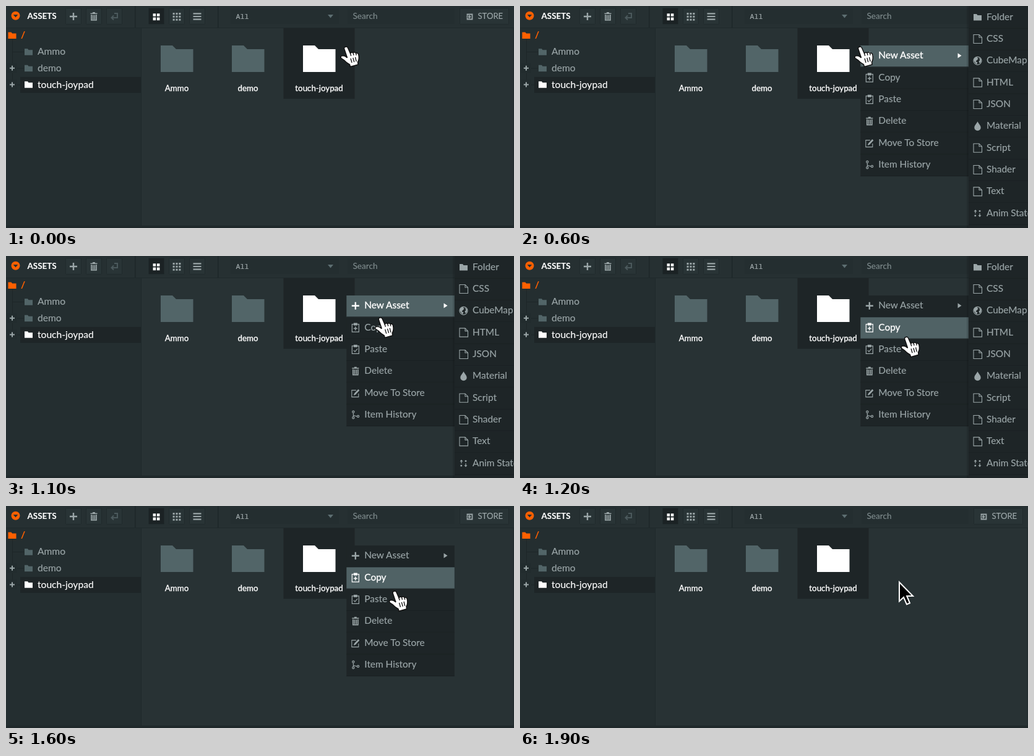
These frames come from a looping animation (821 by 360 pixels, 2.1 s). An HTML page:

```html
<!DOCTYPE html>
<html lang="en">
<head>
<meta charset="utf-8">
<title>Assets panel</title>
<style>
html, body { margin: 0; width: 100%; height: 100%; overflow: hidden; background: #283234; }
svg { display: block; width: 821px; height: 360px; font: 15.4px Lato, sans-serif; }
text { fill: currentColor; stroke: currentColor; stroke-width: .15; }
.line { fill: none; stroke: currentColor; stroke-width: 1.2; }
.solid { fill: currentColor; }
.row { color: #9ba6a8; }
.row .back { fill: #1e2527; }
.row.on { color: #fff; }
.row.on .back { fill: #506265; }
.row.on text, .strong { stroke-width: .35; }
</style>
</head>
<body>
<svg id="stage" viewBox="0 0 821 360"></svg>
<script>
const LOOP = 2100, STEP = 100, ROW = 35.35;
const BRIGHT = '#fff', SOFT = '#9ba6a8', DIM = '#526568', ORANGE = '#ff6000', DARK = '#1e2527';

const rect = (x, y, w, h, fill, extra = '') =>
  `<rect x="${x}" y="${y}" width="${w}" height="${h}" fill="${fill}" ${extra}/>`;
const text = (x, y, label, color, extra = '') =>
  `<text x="${x}" y="${y}" color="${color}" ${extra}>${label}</text>`;
const at = (x, y, content, color = 'inherit') =>
  `<g transform="translate(${x} ${y})" color="${color}">${content}</g>`;
const line = (d, width = 1.2) => `<path class="line" d="${d}" style="stroke-width:${width}"/>`;
const solid = d => `<path class="solid" d="${d}"/>`;
const square = (x, y, size) => `M${x} ${y}h${size}v${size}h${-size}z`;

const board = line('M-3-5.5H-5.5V7H5.5V-5.5H3') + solid('M-3-7.5H3V-3.5H-3Z');
const icons = {
  plus: line('M-6 0H6M0-6V6', 2.4),
  trash: solid('M-5.5-5.5H-2V-7H2V-5.5H5.5V-4H-5.5Z') +
    line('M-4-3V6H4V-3M-1.4-2.5V5M1.4-2.5V5', 1.7),
  copy: board + line('M-3 1.5H3M0-1.5V4.5', 1.5),
  paste: board + line('M-3 1.5L-.8 3.7L3.2-1'),
  edit: line('M1-4.5H-6V6.5H5V1', 1.1) + solid('M-3 4L-2 1L4.5-6L6.5-4L0 3Z'),
  history: line('M-3.5-3.3V3.3M-3.5 0Q-3 2 2.8 2.4', 1.1) +
    [[-3.5, -4.8], [-3.5, 4.8], [4.2, 2.5]].map(([x, y]) => `<circle class="line" cx="${x}" cy="${y}" r="1.6"/>`).join(''),
  folder: solid('M-6.5-5H-1.5L0-3H6.5V5.5H-6.5Z'),
  page: line('M-6.5-7H2.5L7-2.5V7H-6.5ZM2.5-7V-2.5H7', 1.1),
  globe: '<circle class="line" r="6.5"/>' + solid('M-5-4L-1-6L1-3L-1-1L-3 1L0 3L-2 6L-4 3L-6 0ZM2-5L6-2L5 3L3 4L2 1L4-1Z'),
  drop: solid('M0-7.5C2-3.5 5.2-1 5.2 2.3A5.2 5 0 0 1-5.2 2.3C-5.2-1-2-3.5 0-7.5Z'),
  anim: solid('M-3.5-6L-1-3H-6ZM-4.1-3H-2.9V0H-4.1ZM3.5 6L1 3H6ZM2.9 0H4.1V3H2.9Z' +
    square(-5, 2.5, 2.6) + square(2.2, -5, 2.6)),
  back: line('M0-5H5V2H-4M-1-1.5L-4.5 2L-1 5.5', 2)
};

const button = (x, content, fill = '#293436') =>
  rect(x + .5, 3.5, 25, 26, fill, 'stroke="#202a2c" rx="1"') + at(x + 13, 17, content, SOFT);

function header() {
  const tiles = (step, size, count) => {
    let d = '';
    const start = -((count - 1) * step + size) / 2;
    for (let i = 0; i < count * count; i++)
      d += square(start + i % count * step, start + Math.floor(i / count) * step, size);
    return solid(d);
  };
  return rect(0, 0, 821, 35, '#263032') +
    rect(0, 35, 821, 1, '#1f292b') +
    rect(208, 0, 1.5, 35, '#1d2628') + rect(342, 0, 1.5, 35, '#1d2628') +
    `<circle cx="15.5" cy="15.8" r="7" fill="${ORANGE}"/>` +
    '<path d="M11.7 14H19.3L15.5 18.5Z" fill="#263032"/>' +
    text(34.5, 20.8, 'ASSETS', BRIGHT, 'font-size="13.4" font-weight="700"') +
    button(96, icons.plus) + button(129, icons.trash) +
    button(162, `<g color="#4b595c">${icons.back}</g>`) +
    button(230, at(0, .7, tiles(6.3, 4.6, 2), BRIGHT), '#1b2224') +
    button(263, at(0, .3, tiles(4.9, 3, 3))) + button(296, line('M-6.5-4.7H6.5M-6.5 0H6.5M-6.5 4.7H6.5', 2.2)) +
    rect(363, 4, 175, 25, '#242e30') +
    text(371.5, 20.8, 'All', '#a5afb1', 'style="font:11.6px \'Noto Sans Mono\',monospace"') +
    `<path d="M520 14H529L524.5 19.5Z" fill="#5d6e71"/>` +
    rect(552, 4, 173, 25, '#242e30') +
    text(560.5, 21, 'Search', '#7f8b8d', 'font-size="13.6"') +
    rect(733.5, 3.5, 79, 26, '#293436', 'stroke="#202a2c" rx="1"') +
    at(749, 17.5, line('M-3.5-1.5V-4H4.5V4H-3.5V1.5', 1.8) + line('M-5 0H1M-1-2.5L1.5 0L-1 2.5', 1.6), SOFT) +
    text(762.5, 21.4, 'STORE', SOFT, 'font-size="13.1"');
}

function tree() {
  const expand = y => rect(2, y - 8, 16, 16, '#222c2e') +
    at(10, y, line('M-4 0H4M0-4V4', 2), SOFT);
  const entry = (y, label, color, iconColor) =>
    at(36.5, y - .5, icons.folder, iconColor) + text(51, y + 4.7, label, color, 'font-size="15.6"');
  return rect(0, 36, 218, 320, '#242e30') + rect(218, 36, 1, 320, '#1f292b') +
    rect(23, 115, 195, 26, DARK) +
    at(0, 0, line('M10.5 54V128M10.5 74.5H29M18 101H29M18 128H23', 1), '#1d2628') +
    at(10, 47.4, icons.folder, ORANGE) + text(24, 52.3, '/', ORANGE, 'font-weight="700"') +
    expand(100.7) + expand(127.4) +
    entry(74.7, 'Ammo', SOFT, DIM) + entry(101.2, 'demo', SOFT, DIM) +
    entry(127.8, 'touch-joypad', BRIGHT, BRIGHT);
}

function grid() {
  return rect(448.5, 36, 115, 114.5, DARK) +
    ['Ammo', 'demo', 'touch-joypad'].map((label, i) =>
      at(276 + i * 115, 0,
        `<path d="M-26 64H-7L-1 70H26.5V107H-26Z" fill="${i === 2 ? BRIGHT : DIM}"/>` +
        text(0, 138.4, label, BRIGHT, 'class="strong" font-size="13.3" text-anchor="middle"'))).join('') +
    rect(819, 36, 2, 320, '#232d2f') + rect(0, 356, 821, 4, '#20292b');
}

const menuRow = (x, y, w, icon, label) =>
  `<g class="row">${rect(x, y, w, ROW, DARK, 'class="back"')}` +
  rect(x, y + ROW - 1, w, 1, '#1a2022') +
  at(x + 14.5, y + 16.7, icons[icon]) + text(x + 29, y + 21.2, label, 'inherit') + '</g>';

const menuItems = [['plus', 'New Asset'], ['copy', 'Copy'], ['paste', 'Paste'],
  ['trash', 'Delete'], ['edit', 'Move To Store'], ['history', 'Item History']];
const assetTypes = [['folder', 'Folder'], ['page', 'CSS'], ['globe', 'CubeMap'], ['page', 'HTML'],
  ['page', 'JSON'], ['drop', 'Material'], ['page', 'Script'], ['page', 'Shader'],
  ['page', 'Text'], ['anim', 'Anim State Graph'], ['page', '']];

const hand = '<path d="M0 .5Q3-1 4.5 2L8.5 11Q10.5 8 13 10Q15 8 17.5 10.5Q21 9.5 21.8 13Q23.5 20 20.5 25L21 29L8.5 32.5L7.5 29Q2 26-2 21.5L-6.5 18.5Q-8 15-4 14.5Q0 14.5 3.5 18L-1.2 4Q-2 1 0 .5Z" fill="#fff" stroke="#111" stroke-width="1.5"/>' +
  '<path d="M8.5 11L9.7 15M13 10L14 14M17.5 10.5L18.2 14M9 19L11 26M12.8 18L14.8 25M16.5 17L18.2 24" fill="none" stroke="#111" stroke-width="1.3"/>';
const arrow = '<path d="M1 1.5V32.5L8 26L13 37.5L18 35.5L13.2 24H23Z" fill="#000" stroke="#fff" stroke-width="2"/>';

const stage = document.getElementById('stage');
stage.innerHTML = rect(0, 0, 821, 360, '#283234') + header() + tree() + grid() +
  `<g id="menu">${menuItems.map(([icon, label], i) =>
    menuRow(550.3, 64 + i * ROW, 174.5, icon, label)).join('')}` +
  at(707.5, 80.5, solid('M0-4L6 0L0 4Z'), SOFT) + '</g>' +
  `<g id="submenu">${rect(722, 0, 3, 360, '#000', 'opacity=".12"')}${rect(725, 0, 96, 2, DARK)}${
    assetTypes.map(([icon, label], i) => menuRow(725, 1.4 + i * ROW, 96, icon, label)).join('')}</g>` +
  `<g id="hand">${hand}</g><g id="arrow">${arrow}</g>`;

const [menu, submenu, handCursor, arrowCursor] =
  ['menu', 'submenu', 'hand', 'arrow'].map(id => document.getElementById(id));
const rows = menu.querySelectorAll('.row');
const pointer = menu.lastElementChild;
const show = (node, visible) => node.setAttribute('visibility', visible ? 'visible' : 'hidden');
const move = (node, x, y) => node.setAttribute('transform', `translate(${x} ${y})`);

function draw() {
  const t = Math.floor(performance.now() % LOOP / STEP) * STEP;
  const active = t < 1200 ? 0 : 1;
  show(menu, t >= 600 && t < 1800);
  show(submenu, t >= 600 && t < 1300);
  rows.forEach((row, i) => row.classList.toggle('on', i === active));
  pointer.setAttribute('color', active ? SOFT : BRIGHT);

  const u = Math.min(1, Math.max(0, (t - 820) / 435));
  const glide = u * u * (3 - 2 * u);
  show(handCursor, t < 1800);
  show(arrowCursor, t >= 1800);
  move(handCursor, 548 + 78.5 * glide, 66 + 72 * glide ** 2.2);
  move(arrowCursor, t < 1900 ? 617 : 612, t < 1900 ? 127 : 122);
  requestAnimationFrame(draw);
}
draw();
</script>
</body>
</html>
```
